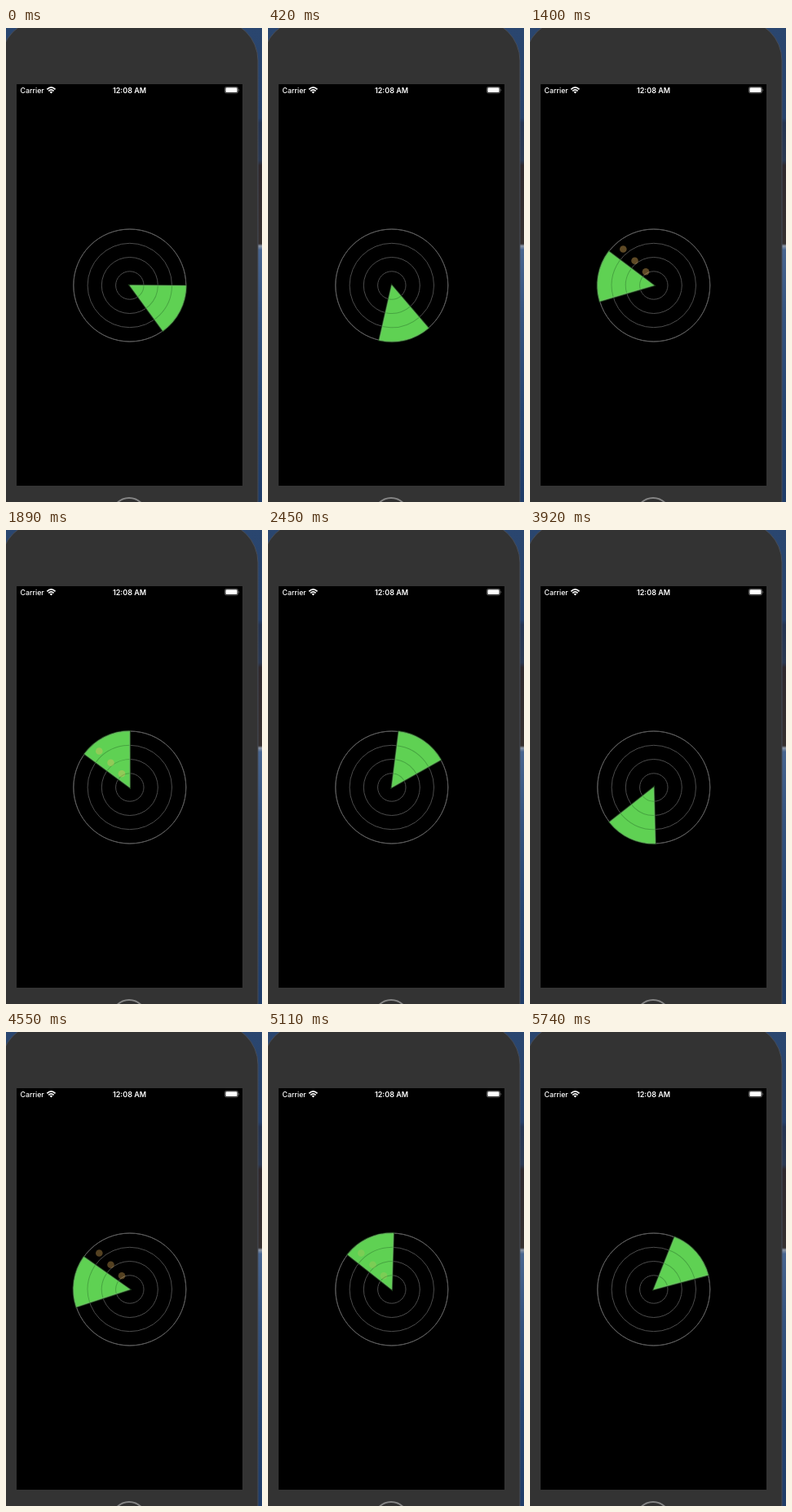
An HTML page for the animation above (5810 ms loop, 314 px wide and 582 px high).

```html
<!DOCTYPE html>
<html lang="en">
<head>
<meta charset="utf-8">
<title>Radar sweep</title>
<style>
  html, body { margin: 0; width: 100%; height: 100%; overflow: hidden; background: #000; }
  svg { display: block; }
  text { font-family: Inter, Roboto, sans-serif; fill: #fff; }
</style>
</head>
<body>
<svg width="314" height="582" viewBox="0 0 314 582">
  <defs>
    <linearGradient id="desk" x1="0" y1="0" x2="0" y2="1">
      <stop offset="0" stop-color="#2a466f"/>
      <stop offset=".19" stop-color="#27426b"/>
      <stop offset=".2" stop-color="#263551"/>
      <stop offset=".28" stop-color="#2c3a52"/>
      <stop offset=".29" stop-color="#30292d"/>
      <stop offset=".455" stop-color="#36302f"/>
      <stop offset=".46" stop-color="#8b96a6"/>
      <stop offset=".468" stop-color="#48658f"/>
      <stop offset=".6" stop-color="#36547f"/>
      <stop offset=".8" stop-color="#254470"/>
      <stop offset="1" stop-color="#1f3c68"/>
    </linearGradient>
    <path id="sector"/>
    <clipPath id="inSector"><use href="#sector"/></clipPath>
    <g id="rings" fill="none">
      <circle r="17.2"/><circle r="34.5"/><circle r="51.7"/><circle r="69"/>
    </g>
  </defs>

  <rect width="314" height="582" fill="url(#desk)"/>
  <rect x="-6" y="-10" width="315" height="640" rx="50" fill="#333" stroke="#474d58"/>
  <circle cx="151" cy="598" r="21" fill="#303030" stroke="#858585" stroke-width="2"/>
  <rect x="13" y="69" width="277" height="493"/>

  <text x="17.5" y="79.7" font-size="8.8" font-weight="500">Carrier</text>
  <text x="151.5" y="79.7" font-size="9" font-weight="600" text-anchor="middle">12:08 AM</text>
  <g fill="none" stroke="#fff" stroke-width="1.7">
    <path d="M50.3 75.3Q55.4 70.4 60.5 75.3M52.2 77.4Q55.4 74.4 58.6 77.4"/>
    <path d="M53.6 78.5Q55.4 77.2 57.2 78.5L55.4 80.4Z" fill="#fff" stroke="none"/>
  </g>
  <rect x="268.4" y="72.4" width="16.2" height="7.6" rx="2.2" fill="none" stroke="#777" stroke-width=".8"/>
  <rect x="269.4" y="73.3" width="14.2" height="5.8" rx="1.3" fill="#fff"/>
  <path d="M285.6 74.8Q287.2 76.2 285.6 77.6Z" fill="#888"/>

  <g transform="translate(151.8 316)">
    <use href="#rings" stroke="#4c4c4c"/>
    <circle r="69" fill="none" stroke="#5c5c5c"/>
    <g id="sweep">
      <use href="#sector" fill="none" stroke="#1d431a" stroke-width="2.4"/>
      <use href="#sector" fill="#5fd153"/>
      <use href="#rings" stroke="#429a3c" stroke-opacity=".8" clip-path="url(#inSector)"/>
      <use href="#sector" fill="none" stroke="#8cc786" stroke-opacity=".5" stroke-width=".9"/>
    </g>
    <g id="blips" fill="#f5bf62">
      <circle cx="-37.5" cy="-44.5" r="4.3"/>
      <circle cx="-23.3" cy="-30.2" r="4.3"/>
      <circle cx="-9.8" cy="-16.8" r="4.3"/>
    </g>
  </g>
</svg>
<script>
  const LOOP = 5810, TICK = 70;
  const SPEED = 0.1165;                 // degrees per ms
  const TURN = 360 / SPEED, PAUSE = 75; // short rest after each turn
  const LAP = TURN + PAUSE;
  const START = 0.5, TOP = 216.5;       // trailing edge at load and at the rest
  const FIRST_REST = (TOP - START) / SPEED;
  const WIDTH = 53.4 * Math.PI / 180, RADIUS = 69;

  const sweep = document.getElementById('sweep');
  const blips = document.getElementById('blips');
  const clamp = v => Math.min(1, Math.max(0, v));

  document.getElementById('sector').setAttribute('d',
    `M0 0H${RADIUS}A${RADIUS} ${RADIUS} 0 0 1 ${RADIUS * Math.cos(WIDTH)} ${RADIUS * Math.sin(WIDTH)}Z`);

  function angleAt(t) {
    if (t < FIRST_REST) return START + t * SPEED;
    const sinceRest = (t - FIRST_REST) % LAP;
    return TOP + Math.max(0, sinceRest - PAUSE) * SPEED;
  }

  function blipAlpha(t) {
    const u = t % LAP;
    return Math.min(clamp((u - 1265) / 350), clamp((2010 - u) / 350));
  }

  function draw(now) {
    const t = Math.floor((now % LOOP) / TICK) * TICK;
    sweep.setAttribute('transform', `rotate(${angleAt(t)})`);
    blips.setAttribute('opacity', blipAlpha(t));
  }

  const begin = performance.now();
  function loop() {
    draw(performance.now() - begin);
    requestAnimationFrame(loop);
  }
  loop();
</script>
</body>
</html>
```
